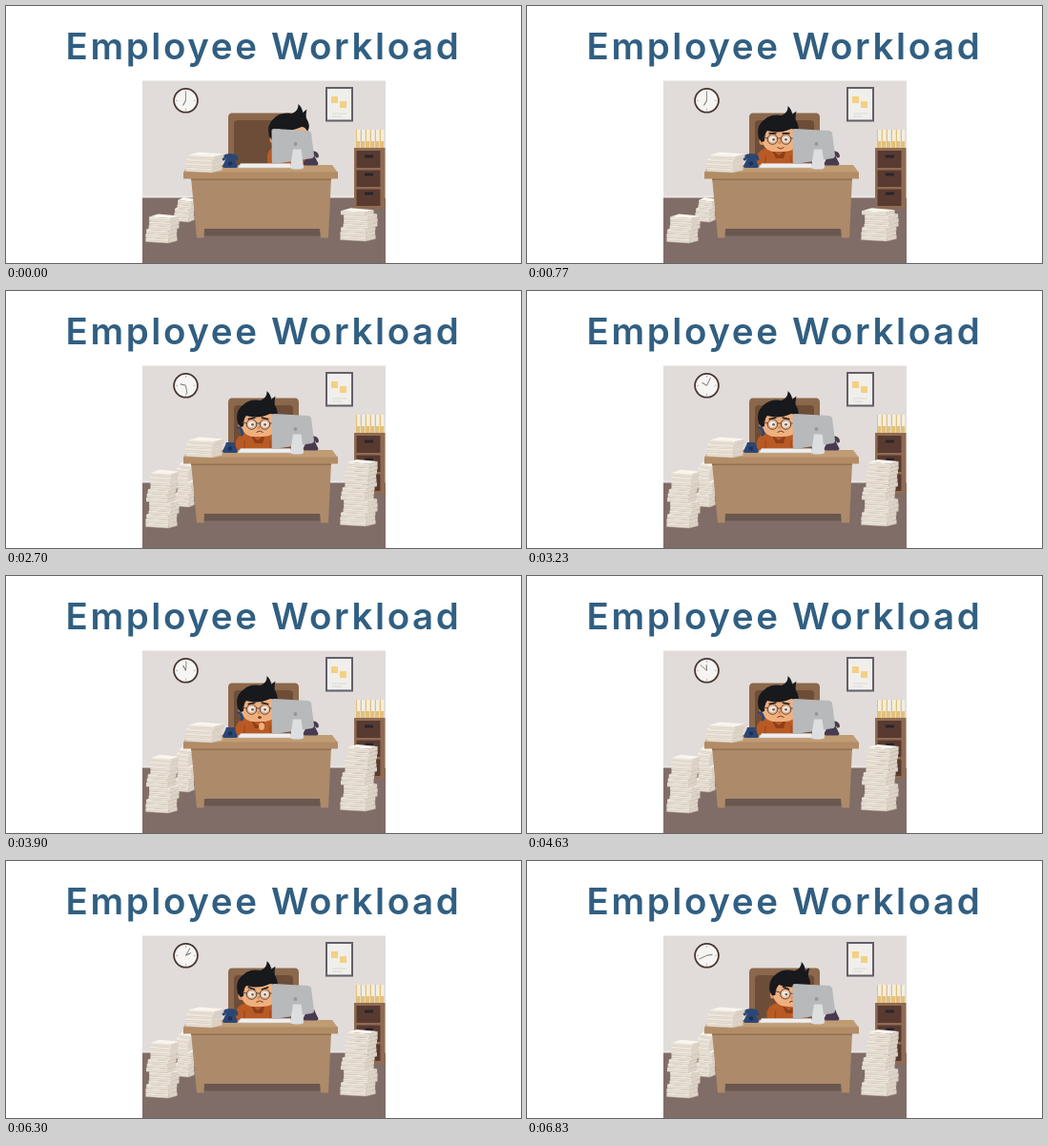
An HTML page that plays this animation: 540x270 px, repeating every 6.9 s.

```html
<!DOCTYPE html>
<html lang="en">
<head>
<meta charset="utf-8">
<title>Employee Workload</title>
<style>
html, body { margin: 0; width: 100%; height: 100%; overflow: hidden; background: #fff; }
svg { display: block; width: 540px; height: 270px; }
.title { font: 600 38.5px Inter, "Open Sans", sans-serif; letter-spacing: 2.6px; fill: #315f82; }
</style>
</head>
<body>
<svg viewBox="0 0 540 270">
  <defs>
    <clipPath id="room"><path d="M143 78.500H398V270H143z"/></clipPath>
    <path id="handset" d="M-8.500 2Q-8.500-4 0-4T8.500 2Q8.500 3.500 6 3.500L4 1Q0-1-4 1L-6 3.500Q-8.500 3.500-8.500 2z"/>
    <path id="base" d="M-4-1H4L5 2 8 8Q8 10 6 10H-6Q-8 10-8 8L-5 2z"/>
  </defs>
  <text class="title" x="62.500" y="55.800">Employee</text>
  <text class="title" x="278" y="55.800">Workload</text>
  <g clip-path="url(#room)">
    <path fill="#e1dcd9" d="M143 78H398V202H143z"/>
    <path fill="#ebe7e5" d="M143 199.500H398V202H143z"/>
    <path fill="#806d67" d="M143 201.500H398V270H143z"/>

    <circle cx="188.500" cy="99.300" r="12.400" fill="#f7f5f3" stroke="#493731" stroke-width="1.800"/>
    <path stroke="#b9b1ac" d="M188.500 89v2M188.500 107.600v2M178.200 99.300h2M196.800 99.300h2"/>
    <path id="hour" stroke="#77706f" d="M188.500 99.300v-6"/>
    <path id="minute" stroke="#77706f" stroke-width=".8" d="M188.500 99.300v-9"/>

    <path fill="#f1efec" stroke="#625f69" stroke-width="2" d="M336 86H363V120.500H336z"/>
    <path fill="#f4d083" d="M341 95h7v7h-7zM350 100h7v7h-7z"/>
    <path stroke="#d5d1cf" stroke-width=".8" d="M342 113h15M342 116h10"/>

    <g id="folders"></g>
    <path fill="#8f6b53" d="M365 149H397.500V213H365z"/>
    <path fill="#583a31" d="M367.500 152H392.500V170H367.500zM367.500 172.500H392.500V190H367.500zM367.500 192.500H392.500V210H367.500z"/>
    <path fill="#29252c" d="M376 156.500h9v3h-9zM376 175.500h9v3h-9zM376 195.500h9v3h-9z"/>

    <path fill="#8b684b" d="M233 168V117Q233 112.500 237 112.500H303Q307 112.500 307 117V168z"/>
    <path fill="#6d4d38" d="M239 168V124Q239 120 243 120H297Q301 120 301 124V168z"/>

    <g id="person">
      <path fill="#b95a24" d="M241 170V158Q243 150 254 149H273Q282 149 284 158V170z"/>
      <path fill="#8d3f19" d="M256 150l8 7 8-7-3 10h-8z"/>
      <path stroke="#96451b" d="M250 157v12M277 157v12"/>
      <g id="head">
        <ellipse cx="246.500" cy="142" rx="3" ry="4" fill="#dd925f"/>
        <path fill="#efb07e" d="M247 128H282Q285 136 283 144Q281 152.500 270 153H258Q248 151 247 142z"/>
        <path fill="#18191d" d="M243 139Q240 127 247 121Q254 113 267 115Q274 112 273.500 105Q278 109 278 114L282.500 110.500Q281 117 282 120Q287 128 283 134Q281 129 277 129Q264 135 252 131Q249 134 249 142L246 143z"/>
        <g id="face">
          <g fill="#fff">
            <ellipse cx="257.500" cy="140" rx="3.300" ry="3"/>
            <ellipse cx="271.500" cy="140" rx="3.300" ry="3"/>
          </g>
          <circle cx="258.500" cy="140.300" r="1.400" fill="#3a2c28"/>
          <circle cx="271.500" cy="140.300" r="1.400" fill="#3a2c28"/>
          <g fill="#d9c6b8" fill-opacity=".35" stroke="#4c403a" stroke-width=".9">
            <circle cx="257.500" cy="140" r="5.300"/>
            <circle cx="271.500" cy="140" r="5.300"/>
            <path d="M262.800 139h3.400M252.200 139l-5-1M276.800 139h5"/>
          </g>
          <g stroke="#1d191a" stroke-width="1.500">
            <path id="browL" d="M253.500 133.800h8"/>
            <path id="browR" d="M267.500 133.800h8"/>
          </g>
          <path fill="#dc8c59" d="M263.500 142h2.500v3h-2.500z"/>
          <path id="mouth" fill="none" stroke="#79382a"/>
          <ellipse id="gasp" cx="266" cy="148.500" rx="1.800" ry="1.500" fill="#70352a"/>
        </g>
      </g>
      <ellipse id="hand" cx="268" cy="158" rx="3" ry="4" fill="#efb07e"/>
    </g>

    <g id="behind"></g>
    <path fill="#6a5850" d="M205 232H332V241.500H205z"/>
    <path fill="#ad8a69" d="M194 180H341L338 243.500H330L329 234H208L207.500 243.500H200z"/>
    <path fill="#94704f" d="M194 181H341V183H194z"/>
    <path fill="#c09c75" d="M191 167H342L348 175H186z"/>
    <path fill="#b28c66" d="M186 174.500H348V181.500H186z"/>

    <path fill="#f0eeee" stroke="#c9c2bc" stroke-width=".6" d="M246 165.500H298L300 170H243z"/>
    <g fill="#2c4774">
      <use href="#base" x="235" y="160"/>
      <use id="receiver" href="#handset"/>
    </g>
    <circle cx="235" cy="165.500" r="2.300" fill="#1c3157"/>
    <g fill="#493b4e">
      <use href="#base" x="319.500" y="157.500"/>
      <use id="spare" href="#handset" x="319.500" y="156"/>
    </g>

    <path fill="#b8b9bb" d="M278.500 130.500Q279 129 281 129L317 131Q319.500 131.500 320 133.500L323 157Q323 159.500 321 160L281 166Q279 166 278.800 164z"/>
    <circle cx="303.500" cy="145" r="1.900" fill="#96979a"/>
    <path fill="#dddee0" d="M301 150.500H309.500L312 169.500Q312 171.500 305 171.500T298 169.500z"/>
    <g id="front"></g>
  </g>
</svg>
<script>
const LOOP = 6900, HOLD = 170, STEP = 200 / 3, SHEET = 4.4;
const $ = id => document.getElementById(id);
const set = (id, name, value) => $(id).setAttribute(name, value);
const show = (el, on) => { el.style.display = on ? "" : "none"; };

function make(parent, tag, attrs) {
  const el = document.createElementNS("http://www.w3.org/2000/svg", tag);
  for (const name in attrs) el.setAttribute(name, attrs[name]);
  return parent.appendChild(el);
}

// Smooth 0 to 1 between two times
function ramp(t, from, to) {
  const p = Math.min(1, Math.max(0, (t - from) / (to - from)));
  return p * p * (3 - 2 * p);
}

for (let x = 367; x < 396; x += 5) {
  make($("folders"), "path", { fill: "#f5eedc", d: `M${x} 130h4.200v19h-4.200z` });
  make($("folders"), "path", { fill: "#e3c07a", d: `M${x} 130h1v19h-1zM${x} 142h4.200v7h-4.200z` });
}

function bundle(parent, cx, y, w) {
  const g = make(parent, "g", {}), h = SHEET;
  const l = cx - w / 2, r = cx + w / 2, m = r - w * .28;
  const shape = (fill, d) => make(g, "path", { fill, d });
  shape("#eee7dc", `M${l} ${y - h - 1}L${m} ${y - h + .5}V${y}L${l} ${y - 1.5}z`);
  shape("#dcd2c5", `M${m} ${y - h + .5}L${r} ${y - h - 2}V${y - 2.5}L${m} ${y}z`);
  shape("#faf6ee", `M${l} ${y - h - 1}L${l + w * .3} ${y - h - 4}L${r} ${y - h - 2}L${m} ${y - h + .5}z`);
  make(g, "path", { fill: "none", stroke: "#c6bbae", "stroke-width": .5,
    d: `M${l} ${y - 1.5}L${m} ${y}L${r} ${y - 2.5}M${l} ${y - h / 2 - 1}L${m} ${y - h / 2 + .4}` });
  return g;
}

// Sheets lie in clumps of three; those above the first few are added evenly over time
const added = [];
function stack(layer, cx, base, w, first, total = first) {
  for (let i = 0; i < total; i++) {
    const x = cx + 1.8 * Math.sin(Math.floor(i / 3) * 2.2) + .5 * Math.sin(i * 5) + i * .25;
    const el = bundle($(layer), x, base - i * SHEET, w - i * .4);
    if (i >= first) added.push([el, 900 + 1500 * (i - first + 1) / (total - first + 1)]);
  }
}

stack("behind", 187, 227, 21, 5, 10);
stack("front", 163, 249, 33, 6, 13);
stack("front", 369, 247, 37, 7, 15);
stack("front", 207.5, 175, 38, 4);

function draw(t) {
  const hours = 7 + 1.28 * Math.max(0, t - 770) / 1000;
  set("hour", "transform", `rotate(${hours * 30} 188.5 99.3)`);
  set("minute", "transform", `rotate(${hours * 360} 188.5 99.3)`);
  for (const [el, start] of added) show(el, t >= start);

  const hidden = 1 - ramp(t, 170, 700), leaving = ramp(t, 6300, 6830);
  set("person", "transform", `translate(${33 * hidden + 11 * leaving} ${-2 * hidden})`);
  set("head", "transform", `rotate(${5 * leaving} 264 150)`);
  set("face", "transform", `translate(${2 * leaving} 0)`);

  const worry = ramp(t, 900, 1600), anger = ramp(t, 4500, 5300);
  const brow = 32 * anger - 12 * worry;
  set("browL", "transform", `rotate(${brow} 257.5 133.8)`);
  set("browR", "transform", `rotate(${-brow} 271.5 133.8)`);
  set("mouth", "d", `M262.500 148.500Q266 ${151.5 - 6 * worry} 269.500 148.500`);

  const shocked = t > 3600 && t < 4500;
  show($("gasp"), shocked);
  show($("hand"), shocked);
  show($("mouth"), !shocked);

  const lift = ramp(t, 2150, 2450) - ramp(t, 4600, 4900);
  set("receiver", "transform",
    `translate(${235 + 11 * lift} ${159 - 12 * lift}) rotate(${65 * lift}) scale(${1 - .35 * lift})`);
  show($("spare"), t < 6200);
}

function tick(now) {
  const t = now % LOOP;
  draw(t < HOLD ? 0 : HOLD + Math.floor((t - HOLD) / STEP + .05) * STEP);
  requestAnimationFrame(tick);
}
requestAnimationFrame(tick);
</script>
</body>
</html>
```
